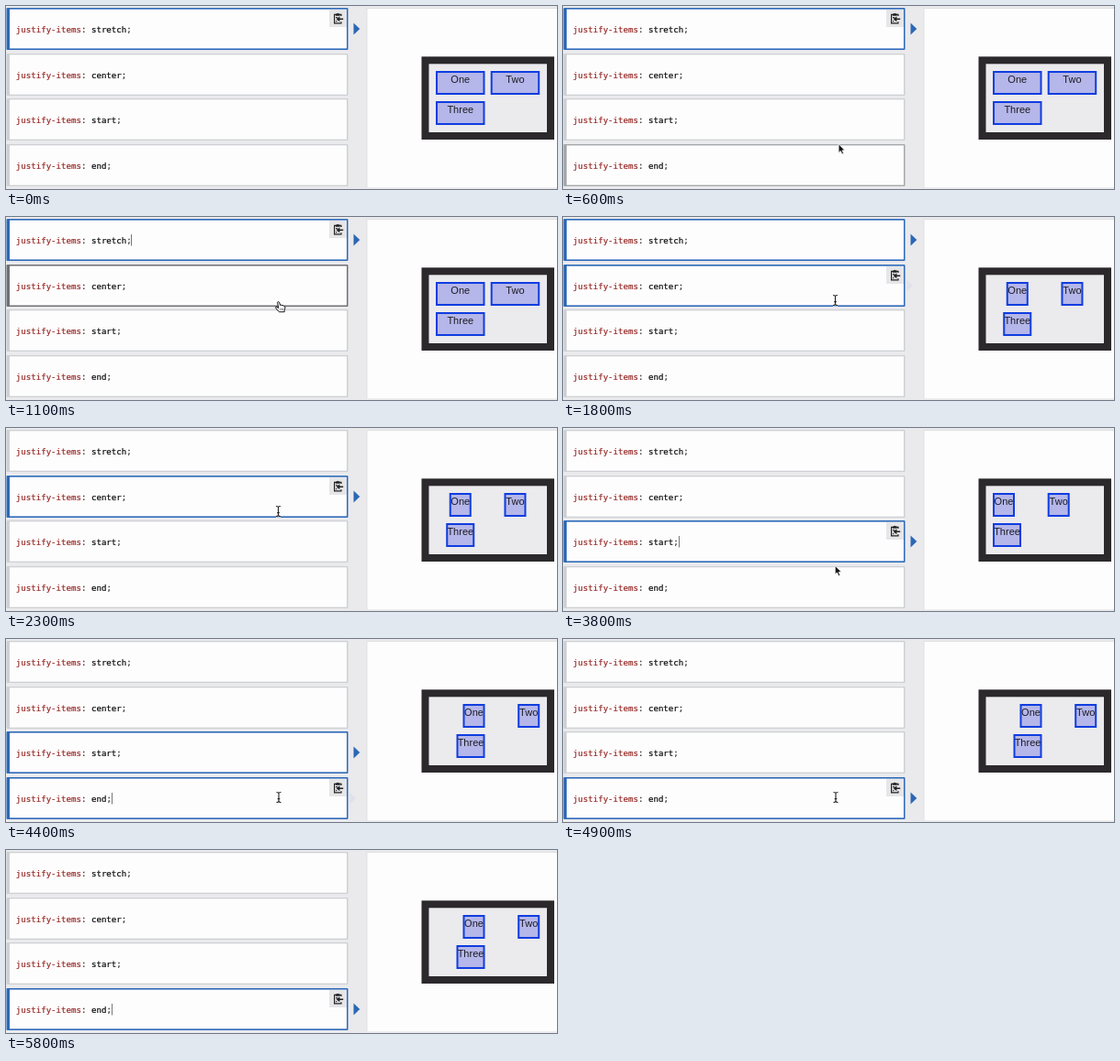
Animation of 600x200 px, one loop 5900 ms. Source, as an HTML page:

```html
<!DOCTYPE html>
<html lang="en">
<head>
<meta charset="utf-8">
<title>justify-items</title>
<style>
  html, body { margin: 0; width: 100%; height: 100%; overflow: hidden; background: #eaeaed; }
  svg { display: block; width: 600px; height: 200px; }
  .code { font: 9.1px "DejaVu Sans Mono", monospace; white-space: pre; fill: #0a0a0a; stroke: #0a0a0a; stroke-width: .2; }
  .prop { fill: #962b27; stroke: #962b27; }
  .punct { fill: #333; stroke: #333; }
  .item { font: 11px "Liberation Sans", Arial, sans-serif; fill: #1c1c24; text-anchor: middle; }
</style>
</head>
<body>
<svg id="stage" viewBox="0 0 600 200" xmlns="http://www.w3.org/2000/svg"></svg>
<script>
const LOOP = 5900, STEP = 100;
const LIGHT = [205, 209, 211], DARK = [70, 71, 75], BLUE = [44, 105, 184];
const CELL = 53.5, CARD_H = 46;

const CHOICES = [
  { value: 'stretch', click: -900, caret: true },
  { value: 'center', click: 1800, caret: false },
  { value: 'start', click: 3400, caret: true },
  { value: 'end', click: 4400, caret: true }
];

// pointer: eased legs between resting points
const ENTRY = { x: 303, y: 200 };
const LEGS = [
  { from: 100, to: 1170, x: 296.5, y: 91 },
  { from: 2400, to: 2900, x: 295.5, y: 128 },
  { from: 3500, to: 4100, x: 297, y: 173 }
];
const POINTER_GONE = 5200;

const stage = document.getElementById('stage');

function add(tag, attrs, parent = stage, text) {
  const el = document.createElementNS('http://www.w3.org/2000/svg', tag);
  set(el, attrs);
  if (text) el.textContent = text;
  return parent.appendChild(el);
}
function set(el, attrs) { for (const k in attrs) el.setAttribute(k, attrs[k]); }
const show = (el, on) => el.setAttribute('visibility', on ? 'visible' : 'hidden');
const rect = (x, y, width, height, fill, parent) => add('rect', { x, y, width, height, fill }, parent);
const mix = (a, b, k) => a.map((v, i) => v + (b[i] - v) * k);
const clamp = u => Math.min(1, Math.max(0, u));
const smooth = u => u * u * (3 - 2 * u);
const easeOut = u => 1 - (1 - u) ** 2;
const fade = (t, start) => easeOut(clamp((t - start) / 200));

const cardTop = i => Math.round(2.2 + 49.6 * i);
const activeAt = t => CHOICES.filter(c => t >= c.click).length - 1;

function pointerAt(t) {
  let { x, y } = ENTRY;
  for (const leg of LEGS) {
    const k = smooth(clamp((t - leg.from) / (leg.to - leg.from)));
    x += (leg.x - x) * k;
    y += (leg.y - y) * k;
  }
  return { x, y, on: t >= LEGS[0].from && t < POINTER_GONE };
}

function cardUnder(t) {
  const p = pointerAt(t);
  return p.on ? CHOICES.findIndex((_, i) => p.y >= cardTop(i) && p.y <= cardTop(i) + CARD_H) : -1;
}

// hover eases in and out over two steps
const hovered = (i, t) => .7 * (cardUnder(t) === i) + .3 * (cardUnder(t - STEP) === i);

// the last choice stays lit and fades once the next one is clicked
function selected(i, t) {
  if (t < CHOICES[i].click) return 0;
  const next = CHOICES[i + 1];
  return next ? 1 - fade(t, next.click) : 1;
}

function makeCard({ value }, i) {
  const top = cardTop(i), c = top + CARD_H / 2;
  const edge = add('rect', { x: .5, y: top, width: 372, height: CARD_H, rx: 1 });
  const face = rect(4, top, 367, CARD_H, '#fefdfe');
  const code = add('text', { x: 10.8, y: c + 3.8, class: 'code' });
  add('tspan', { class: 'prop' }, code, 'justify-items');
  add('tspan', { class: 'punct' }, code, ':');
  add('tspan', {}, code, ' ' + value);
  add('tspan', { class: 'punct' }, code, ';');
  const caret = rect(Math.floor(11 + (16 + value.length) * 5.478), c - 6, 1, 12.5, '#777');

  const button = add('g', { transform: `translate(352 ${top + 2})` });
  rect(0, 0, 19, 19, '#e6e6e9', button);
  add('path', {
    d: 'M13 7V5.4H5.6V14.8H13V13.2M7.2 8.6H9M7.2 12.6H8.4', fill: 'none', stroke: '#222', 'stroke-width': 1.2
  }, button);
  add('path', { d: 'M7 6.8V4.6H8.2Q9.3 2.8 10.4 4.6H11.6V6.8Z', fill: '#222' }, button);
  add('path', { d: 'M15.2 9.5H11.4V7.3L7.6 10.3L11.4 13.3V11.1H15.2Z', fill: '#222' }, button);

  const arrow = add('path', { d: `M0 ${c - 6.5}L6.8 ${c}L0 ${c + 6.5}Z`, fill: '#2c67b5' });
  return { edge, face, caret, button, arrow, top };
}

function makeItem(name, col, row, width) {
  const y = 71 + 33 * row;
  const box = add('rect', { y: y + 1, height: 24, fill: '#b5b6e9', stroke: '#0f3de0', 'stroke-width': 2 });
  const label = add('text', { y: y + 12.9, class: 'item' }, stage, name);
  return { box, label, cell: 468 + 59.7 * col, width };
}

function makePointers() {
  const hand = add('g', {});
  add('path', {
    d: 'M-1 .8Q0-.4 1 .8L2 4.2L3.2 3.7L4.3 4.4L5.3 4.2L6.2 5.2Q7.6 5.2 7.4 7L6.6 9.4V11.4H.8L-3.2 6.9Q-3 5.5-1.6 6.1L.1 7.3Z',
    fill: '#fff', stroke: '#111', 'stroke-linejoin': 'round'
  }, hand);
  add('path', { d: 'M2.2 7.4V9.6M3.7 7.4V9.6M5.2 7.4V9.6', stroke: '#333', 'stroke-width': .6 }, hand);
  const beam = add('g', {});
  for (const [stroke, width] of [['#fff', 2.4], ['#222', 1.1]])
    add('path', {
      d: 'M-2.5-5.5Q0-5.5 0-4V4Q0 5.5-2.5 5.5M2.5-5.5Q0-5.5 0-4M0 4Q0 5.5 2.5 5.5M-1.3 1.6H1.3',
      fill: 'none', stroke, 'stroke-width': width
    }, beam);
  const arrow = add('g', {});
  add('path', {
    d: 'M0 0V9.6L2.2 7.6L3.8 11.2L5.5 10.4L4 7H7Z', fill: '#111', stroke: '#fff', 'stroke-width': .8
  }, arrow);
  return { hand, beam, arrow };
}

rect(392.5, 2, 208, 197, '#dfe0e2');
rect(393.5, 3, 207, 195.5, '#fefdfe');
rect(452.5, 55.3, 144.5, 90.7, '#2b292b');
rect(460.5, 63.3, 128.5, 74.7, '#ebeaed');
const cards = CHOICES.map(makeCard);
const items = [makeItem('One', 0, 0, 24), makeItem('Two', 1, 0, 24), makeItem('Three', 0, 1, 31)];
const pointers = makePointers();

function drawCards(t, active) {
  cards.forEach((card, i) => {
    const { click, caret } = CHOICES[i];
    const s = selected(i, t), h = i <= active && s ? 0 : hovered(i, t);
    const inset = 1.3 + .3 * Math.max(s, h);
    const rgb = mix(mix(LIGHT, DARK, h), BLUE, s).map(Math.round);
    set(card.edge, { fill: `rgb(${rgb})` });
    set(card.face, { y: card.top + inset, height: CARD_H - 2 * inset });
    show(card.button, i === active);
    show(card.caret, caret && i === active && (t - click) % 1000 < 500);
    const enter = .06 + .94 * fade(t, click);
    set(card.arrow, { opacity: s * enter, transform: `translate(${374 + 4.5 * enter} 0)` });
  });
}

function drawItems(active) {
  const align = [0, .5, 0, 1][active];
  for (const it of items) {
    const w = active ? it.width : CELL;
    const x = it.cell + (CELL - w) * align;
    set(it.box, { x: x + 1, width: w - 2 });
    set(it.label, { x: x + w / 2 });
  }
}

function drawPointer(t, active) {
  const { x, y, on } = pointerAt(t), over = cardUnder(t);
  const kind = over < 0 ? 'arrow' : over === active ? 'beam' : 'hand';
  for (const k in pointers) {
    show(pointers[k], on && k === kind);
    set(pointers[k], { transform: `translate(${x} ${y})` });
  }
}

function draw(now) {
  const t = Math.floor((now % LOOP) / STEP) * STEP;
  const active = activeAt(t);
  drawCards(t, active);
  drawItems(active);
  drawPointer(t, active);
}

const begin = performance.now();
function tick() {
  draw(performance.now() - begin);
  requestAnimationFrame(tick);
}
tick();
</script>
</body>
</html>
```
